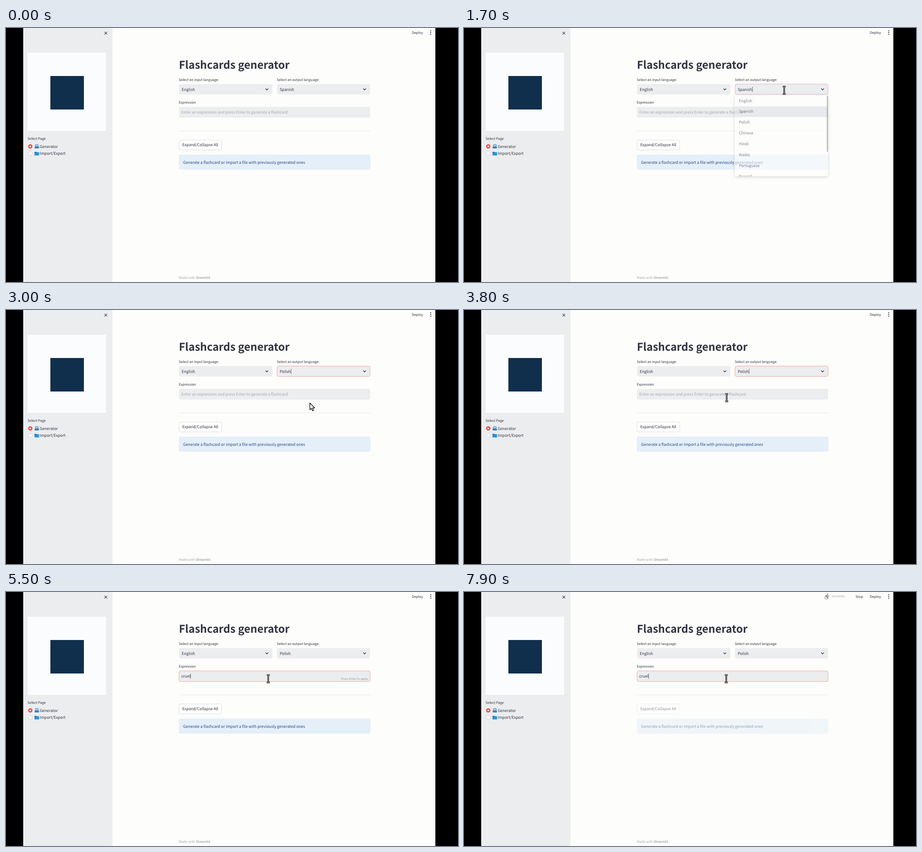
Recreate the animation shown at these times as an HTML page. Size 998 by 561 pixels, loop 8000 ms.

```html
<!DOCTYPE html>
<html lang="en">
<head>
<meta charset="utf-8">
<title>Flashcards generator</title>
<style>
  html, body { margin: 0; width: 100%; height: 100%; overflow: hidden; background: #000; }
  svg { display: block; width: 100vw; height: 100vh; }
  text {
    font-family: "Noto Sans CJK JP", "Noto Sans CJK SC", "Noto Sans CJK KR", "Noto Sans CJK", "Open Sans", sans-serif;
    text-rendering: geometricPrecision;
    white-space: pre;
  }
  #list { filter: drop-shadow(0 2px 3px rgba(0, 0, 0, .26)); }
</style>
</head>
<body>
<svg id="stage" viewBox="0 0 998 561" preserveAspectRatio="none"></svg>
<script>
const LOOP = 8000, STEP = 100;
const INK = '#31333f', FIELD = '#ebedef', FOCUS = '#f0918a';
const stage = document.getElementById('stage');

function el(parent, tag, attrs = {}) {
  const node = document.createElementNS('http://www.w3.org/2000/svg', tag);
  set(node, attrs);
  parent.appendChild(node);
  return node;
}
function set(node, attrs) {
  for (const key in attrs) node.setAttribute(key, attrs[key]);
}
const show = (node, on) => node.setAttribute('opacity', +on);
const group = (parent = stage, attrs) => el(parent, 'g', attrs);
const rect = (parent, x, y, width, height, fill, more) =>
  el(parent, 'rect', { x, y, width, height, fill, ...more });
const circle = (parent, cx, cy, r, fill, more) => el(parent, 'circle', { cx, cy, r, fill, ...more });
const line = (parent, d, stroke, width, more) =>
  el(parent, 'path', { d, stroke, 'stroke-width': width, fill: 'none', ...more });

// The font's Latin glyphs are drawn 1.117 times larger than the nominal UI size.
function label(parent, x, cy, str, size = 9.6, fill = INK, more) {
  const node = el(parent, 'text', { x, y: cy + size * .345, 'font-size': size / 1.117, fill, ...more });
  node.textContent = str;
  return node;
}

// Page and sidebar
rect(stage, 0, 0, 998, 561, '#000');
rect(stage, 38, 0, 910, 561, '#fdfdfb');
rect(stage, 38, 0, 197, 561, FIELD);
line(stage, 'M217.4 8.3l6 6m0-6l-6 6', INK, 1.1);
rect(stage, 47.5, 54.5, 173.5, 172.5, '#fbfcfd');
rect(stage, 98, 106, 74, 74, '#0f2f4d');
label(stage, 47.6, 243.7, 'Select Page', 8.4);

circle(stage, 53.6, 261.5, 4.8, '#ff4b4b');
circle(stage, 53.6, 261.5, 1.8, '#fff');
circle(stage, 53.6, 277, 4.5, '#f6f7f9', { stroke: '#c9ccd1', 'stroke-width': .8 });
rect(stage, 64, 256.8, 8, 8, '#5a9fc9', { rx: 2 });
rect(stage, 65.2, 258.4, 5.6, 2, '#d0e6f2', { rx: .6 });
rect(stage, 63.2, 262.6, 9.6, 3.4, '#3c7fab', { rx: .8 });
label(stage, 74.4, 261.5, 'Generator');
el(stage, 'path', { d: 'M63 273.4h3.6l1 1.2h5v6.6H63z', fill: '#1673b8' });
rect(stage, 63.6, 275.8, 9.4, 5.5, '#2b93dc', { rx: .6 });
label(stage, 74.4, 277, 'Import/Export');

// Top bar
label(stage, 896, 10, 'Deploy', 8.4);
[6.2, 10, 13.8].forEach(y => circle(stage, 937.8, y, 1.15, INK));
const status = group();
label(status, 812, 10, 'RUNNING...', 7.2, '#a9abb1');
label(status, 864.6, 10, 'Stop', 8.4);
const limb = { 'stroke-linecap': 'round', 'stroke-linejoin': 'round' };
const runner = group(status);
circle(runner, 801.4, 4.6, 1.4, '#777a83');
line(runner, 'M800 7l-2 4.5l3 2l-.6 3.4M798 11.5l-1 2.6l-2.4.4M799.8 7l-3 .8l-1 2M800.2 7.2l1.6 2.4l2.2-.2', '#777a83', 1.3, limb);
const wheeler = group(status);
circle(wheeler, 803, 4.8, 1.4, '#777a83');
line(wheeler, 'M801.6 7l-1.6 4l3.6.4l.6 3.6M801.6 7.4l2.4 2l1.4-1M801.4 7.4l-3 1.2', '#777a83', 1.3, limb);
circle(wheeler, 799.6, 12.6, 3.1, 'none', { stroke: '#777a83', 'stroke-width': 1 });

// Main form
label(stage, 381.7, 81.1, 'Flashcards generator', 26.4, INK, { 'font-weight': 700 });

function select(x, width, title, value) {
  label(stage, x, 113.7, title, 8.4);
  const box = rect(stage, x + .4, 123.8, width - .8, 23, FIELD, { rx: 4, 'stroke-width': .8 });
  const text = label(stage, x + 6.4, 135.4, value);
  line(stage, `M${x + width - 15.6} 133.8l3 3l3-3`, INK, 1.4);
  return { box, text };
}
select(381.6, 207, 'Select an input language:', 'English');
const output = select(598, 206.3, 'Select an output language:', 'Spanish');

label(stage, 381.6, 164, 'Expression', 8.4);
const input = rect(stage, 382, 174.2, 422, 23.6, FIELD, { rx: 4, 'stroke-width': .8 });
const hint = label(stage, 387, 186, 'Enter an expression and press Enter to generate a flashcard', 9.6, '#a4a6ac');
const typed = label(stage, 387, 186, '');
const apply = label(stage, 740, 192, 'Press Enter to apply', 7.2, '#92949b');
const caret = rect(stage, 0, 0, .7, 11.4, INK);
rect(stage, 381.6, 226.7, 423, .8, '#dfe1e4');

const stale = group();
rect(stale, 382, 247.2, 94.4, 22, '#fefefe', { rx: 4, stroke: '#d5d6da', 'stroke-width': .8 });
label(stale, 389.2, 258, 'Expand/Collapse All');
rect(stale, 381.6, 279.6, 423, 33.4, '#e5eff9', { rx: 4 });
label(stale, 391, 296.3, 'Generate a flashcard or import a file with previously generated ones', 9.6, '#1d4680');

const foot = label(stage, 381.4, 551.6, 'Made with ', 8.3, '#a6a8ae');
el(foot, 'tspan', { fill: '#83858d' }).textContent = 'Streamlit';

// Drop-down list
const clip = el(el(stage, 'defs'), 'clipPath', { id: 'listClip' });
rect(clip, 597.6, 148.6, 206.6, 179, '#000', { rx: 4 });
const list = group(stage, { id: 'list' });
rect(list, 597.6, 148.6, 206.6, 179, '#fefefd', { rx: 4 });
const rows = group(list, { 'clip-path': 'url(#listClip)' });
const hover = rect(rows, 597.6, 172, 204, 24, '#eff0f2');
'English Spanish Polish Chinese Hindi Arabic Portuguese Bengali'.split(' ')
  .forEach((name, i) => label(rows, 607, 160.2 + i * 23.95, name));
rect(list, 801.5, 149.5, 1.8, 124, '#5c5e65', { rx: .9 });

// Pointers, each with its hot spot at 0,0
const pointer = group();
const beam = group(pointer);
const bar = 'M-3.3-7.6h2.3l1 .9l1-.9h2.3M0-6.7V7.9M-3.3 8.8h2.3l1-.9l1 .9h2.3';
line(beam, bar, '#15161a', 3.4, { 'stroke-linejoin': 'round' });
line(beam, bar, '#e6e7e9', .9);
const outline = { fill: '#fff', stroke: '#111', 'stroke-width': 1.4, 'stroke-linejoin': 'round' };
const hand = group(pointer);
el(hand, 'path', {
  d: 'M-1.6 1.2Q-1.4-.6 0-.5Q1.4-.4 1.7 1.2L2.6 6Q4 4.6 5.3 6Q7 4.9 8.1 6.5Q10.4 5.8 11 8.2L11.6 12' +
     'Q11.6 14.4 10.6 16V18.4H2.2V16.6L-3 11.6Q-4.2 9.8-2.8 9.2Q-1.4 8.8.4 10.8Z', ...outline });
line(hand, 'M2.6 6l.6 3M5.3 6l.5 3M8.1 6.5l.4 2.6', '#111', 1);
const arrow = group(pointer);
el(arrow, 'path', { d: 'M0 0V15L3.4 11.8L5.8 17.2L8.2 16.1L5.9 11L10.6 10.8Z', ...outline });

const path = [
  [600, 720, 575], [1300, 707, 137], [1900, 707, 137], [2500, 671, 205.5],
  [3400, 671, 205.5], [3800, 580, 193], [4000, 579, 191]
];
const strokes = [4900, 5000, 5200, 5300, 5500];

const ramp = (t, a, b) => Math.min(1, Math.max(0, (t - a) / (b - a)));
const ease = k => k * k * (3 - 2 * k);
const between = (v, a, b) => v >= a && v < b;

function pointerAt(t) {
  let [, x, y] = path[0];
  for (let i = 1; i < path.length; i++) {
    const k = ease(ramp(t, path[i - 1][0], path[i][0]));
    x += (path[i][1] - path[i - 1][1]) * k;
    y += (path[i][2] - path[i - 1][2]) * k;
  }
  return [x, y];
}

function placeCaret(text, cy) {
  const x = +text.getAttribute('x') + (text.textContent ? text.getComputedTextLength() : 0) + .3;
  set(caret, { x, y: cy - 5.7 });
}

function draw(t) {
  const [x, y] = pointerAt(t);
  const open = ramp(t, 1580, 1780) * (1 - ramp(t, 2700, 2900));
  const picking = between(t, 1600, 4100), writing = t >= 4100;

  set(output.box, { stroke: picking ? (t < 1800 ? '#e3a0b8' : FOCUS) : 'none' });
  output.text.textContent = t < 2800 ? 'Spanish' : 'Polish';
  set(input, { stroke: writing ? FOCUS : 'none' });
  typed.textContent = 'cruel'.slice(0, strokes.filter(s => t >= s).length);
  show(hint, !typed.textContent);
  show(apply, between(t, strokes[0], 6600));

  if (writing) placeCaret(typed, 186);
  else placeCaret(output.text, 135.4);
  show(caret, (picking || writing) && !between(t, 6900, 7400));

  show(list, open);
  const row = y > 150 ? Math.floor((y - 148.3) / 23.95) : 1;
  set(hover, { y: 148.3 + row * 23.95, fill: open < 1 ? '#e6e8eb' : '#eff0f2' });

  show(status, t >= 6900);
  show(runner, t < 7600);
  show(wheeler, t >= 7600);
  show(stale, 1 - .5 * ramp(t, 7300, 7900));

  const overList = open > .4 && y > 148;
  const overField = between(y, 124, 147) || between(y, 174, 198) && !overList;
  set(pointer, { transform: `translate(${x} ${y})` });
  show(pointer, t >= path[0][0]);
  show(hand, overList);
  show(beam, overField && !overList);
  show(arrow, !overList && !overField);
}

function tick() {
  const t = performance.now() % LOOP;
  draw(Math.floor(t / STEP) * STEP);
  requestAnimationFrame(tick);
}
draw(0);
requestAnimationFrame(tick);
</script>
</body>
</html>
```
